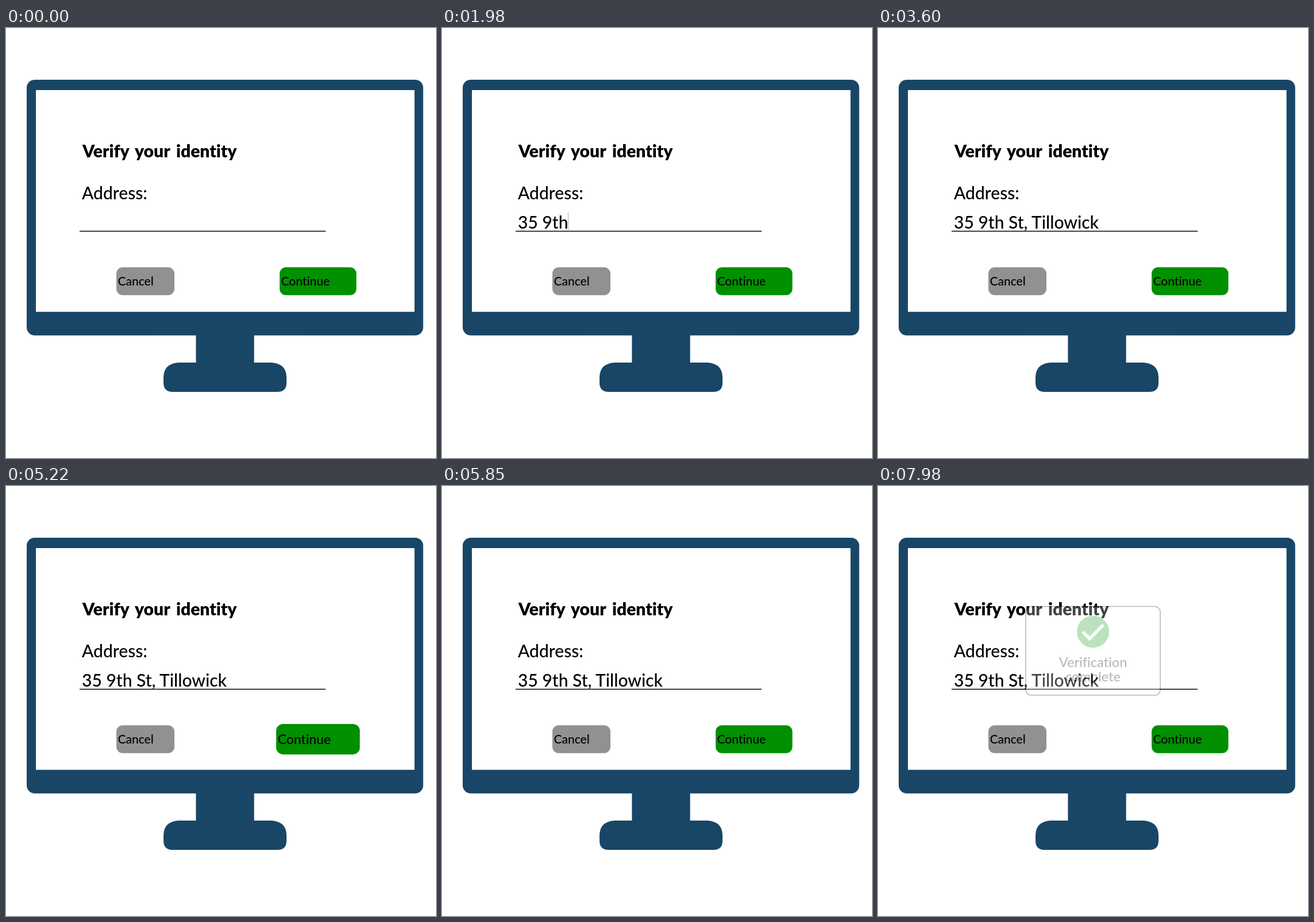
An HTML page that plays this animation: 748 px wide and 748 px high, repeating every 8000 ms.

```html
<!DOCTYPE html>
<html lang="en">
<head>
<meta charset="utf-8">
<title>Verify your identity</title>
<style>
  html, body { margin: 0; width: 100%; height: 100%; overflow: hidden; background: #fff; }
  svg { display: block; width: 100%; height: 100%; }
  text { font: 500 30px Lato, sans-serif; font-variant-ligatures: none; }
  .title { font-weight: 900; word-spacing: 4px; }
  .button text { font-size: 21px; }
  #popup text { font-size: 23.5px; text-anchor: middle; }
</style>
</head>
<body>
<svg viewBox="0 0 748 748">
  <g fill="#194666">
    <rect x="36" y="90" width="689.7" height="444.8" rx="14"/>
    <rect x="330.4" y="530" width="101.2" height="60"/>
    <path d="M300 582H462Q488 584 488 608V617Q488 633 472 633H290Q274 633 274 617V608Q274 584 300 582Z"/>
  </g>
  <rect x="52" y="108" width="658.6" height="385.7" fill="#fff"/>

  <text class="title" x="133" y="225">Verify your identity</text>
  <text x="132" y="298">Address:</text>
  <text id="typed" x="132" y="349"></text>
  <path d="M128 353.5H556" stroke="#000" stroke-width="1.5"/>
  <path id="caret" d="M.5 321V355" stroke="#888"/>

  <g class="button">
    <rect x="192" y="416.2" width="101" height="48.5" rx="11" fill="#919191"/>
    <text x="194.5" y="448">Cancel</text>
  </g>
  <g class="button" id="continue">
    <rect x="476" y="416.2" width="133.5" height="48.5" rx="11" fill="#009000"/>
    <text x="478.5" y="448">Continue</text>
  </g>

  <g id="popup">
    <rect x="-117" y="-77" width="234" height="154.5" rx="10" fill="#fff" stroke="#000" stroke-width="1.6"/>
    <circle cy="-33" r="28" fill="#009a0c"/>
    <path d="M-18 -33L-6 -21L18 -45" fill="none" stroke="#fff" stroke-width="5.5"/>
    <text y="28.5">Verification</text>
    <text y="53.5">complete</text>
  </g>
</svg>
<script>
const LOOP = 8000;
const ADDRESS = "35 9th St, Tillowick";
const [typed, caret, button, popup] =
  ["typed", "caret", "continue", "popup"].map(id => document.getElementById(id));

// Piecewise linear interpolation through [time, value] points.
function track(points, t) {
  const next = points.findIndex(([time]) => time > t);
  if (next === 0) return points[0][1];
  if (next < 0) return points.at(-1)[1];
  const [t0, v0] = points[next - 1], [t1, v1] = points[next];
  return v0 + (v1 - v0) * (t - t0) / (t1 - t0);
}

const letters = [[930, 0], [1710, 5], [1980, 7], [2550, 14], [3400, 20]];
const press = [[4950, 1], [5250, 1.1], [5550, 0.95], [5850, 1]];
const popupScale = [[7710, 0.33], [7980, 1]];
const popupAlpha = [[7710, 0.08], [7980, 0.265]];

function draw(t) {
  typed.textContent = ADDRESS.slice(0, Math.floor(track(letters, t) + 1e-6)).trimEnd();
  const end = typed.textContent ? typed.getComputedTextLength() : 0;
  caret.setAttribute("transform", `translate(${Math.round(132 + end)})`);
  const typing = t >= 930 && t < 3600;
  caret.setAttribute("opacity", typing ? (1 + Math.cos((t - 900) / 300 * Math.PI)) / 2 : 0);

  button.setAttribute("transform",
    `translate(542.75 440.5) scale(${track(press, t)}) translate(-542.75 -440.5)`);

  popup.setAttribute("opacity", t < 7710 ? 0 : track(popupAlpha, t));
  popup.setAttribute("transform", `translate(374 286.5) scale(${track(popupScale, t)})`);
}

function tick() {
  draw(performance.now() % LOOP);
  requestAnimationFrame(tick);
}
tick();
</script>
</body>
</html>
```
